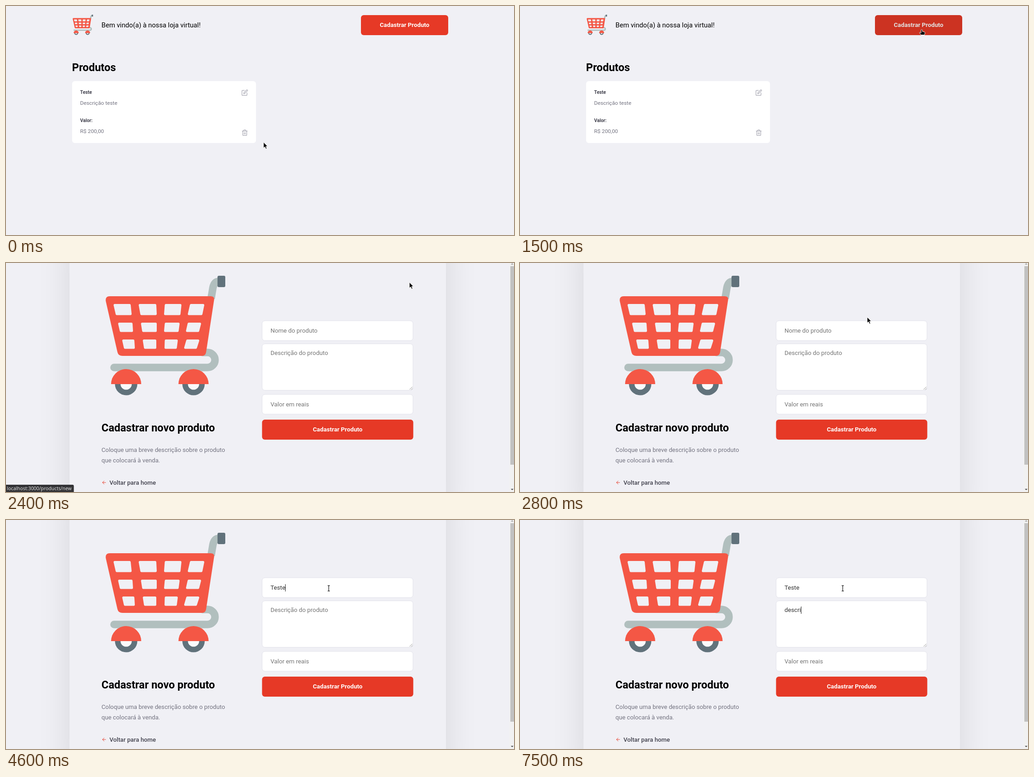
Animation, 1112 px wide and 503 px high, one loop 8000 ms. Source, as an HTML page:

```html
<!DOCTYPE html>
<html lang="pt-BR">
<head>
<meta charset="utf-8">
<title>Loja virtual</title>
<style>
html, body { margin: 0; height: 100%; overflow: hidden; background: #f0f0f5; }
svg { display: block; width: 100vw; height: 100vh; }
text { font: 13.22px Roboto, sans-serif; white-space: pre; }
.title { font-size: 23.5px; font-weight: 700; }
.label { font-size: 10.29px; font-weight: 700; fill: #41414d; }
.info { font-size: 11.76px; fill: #737380; }
.intro { fill: #737380; }
.cta { font-weight: 700; fill: #fff; text-anchor: middle; }
.red { fill: #e63926; }
.icon { fill: none; stroke: #a8a8b3; stroke-width: 2; stroke-linecap: round; stroke-linejoin: round; }
.field { fill: #fff; stroke: #dcdce6; stroke-width: .8; }
.hint { fill: #757575; }
</style>
</head>
<body>
<svg viewBox="0 0 1112 503" preserveAspectRatio="none">
  <defs>
    <filter id="blur" filterUnits="userSpaceOnUse" x="0" y="-200" width="1112" height="900">
      <feGaussianBlur stdDeviation="36.7"/>
    </filter>
    <g id="wheel">
      <circle r="24.5" fill="#61727b"/>
      <circle r="12.3" fill="#fafafc"/>
      <path d="M-33 0A33 33 0 0 1 33 0Z" fill="#f45745"/>
    </g>
    <g id="cart">
      <g fill="none" stroke="#b1bfbe" stroke-width="16.5">
        <path d="M449 78L453 54Q456 40.5 466 40.5"/>
        <path d="M430 196.5H441A16.5 16.5 0 0 1 441 229.5H236.5" stroke-linecap="round"/>
      </g>
      <rect x="463" y="28" width="17" height="25" rx="3" fill="#61727b"/>
      <path d="M227 73H448Q456.500 73 455.500 81L438 196Q436.500 204 429 204H255Q246 204 244 196L218.500 84Q217 73 227 73Z" fill="#f45745"/>
      <path id="holes" fill="#f0f0f5" stroke="#f0f0f5" stroke-width="5" stroke-linejoin="round"/>
      <use href="#wheel" x="263" y="266"/>
      <use href="#wheel" x="410.500" y="266"/>
    </g>
  </defs>

  <g id="home">
    <use href="#cart" transform="translate(108.900 14.200) scale(.17)"/>
    <text x="209" y="46.500" style="font-size:14.690px">Bem vindo(a) à nossa loja virtual!</text>
    <rect class="red" x="777" y="20" width="191" height="44" rx="6"/>
    <text class="cta" x="872.500" y="46">Cadastrar Produto</text>
    <rect id="shade" x="777" y="20" width="191" height="44" rx="6"/>
    <text class="title" x="144.500" y="143">Produtos</text>
    <rect x="144.700" y="165" width="402.500" height="136" rx="6" fill="#fff"/>
    <text class="label" x="162.300" y="192.700">Teste</text>
    <text class="info" x="162.300" y="217">Descrição teste</text>
    <text class="label" x="162.300" y="254.700">Valor:</text>
    <text class="info" x="162.300" y="279">R$ 200,00</text>
    <path class="icon" transform="translate(515.300 183) scale(.6125)" d="M11 4H4a2 2 0 0 0-2 2v14a2 2 0 0 0 2 2h14a2 2 0 0 0 2-2v-7M18.500 2.500a2.121 2.121 0 0 1 3 3L12 15l-4 1 1-4 9.500-9.500z"/>
    <path class="icon" transform="translate(515.300 271) scale(.6125)" d="M3 6h18M19 6v14a2 2 0 0 1-2 2H7a2 2 0 0 1-2-2V6m3 0V4a2 2 0 0 1 2-2h4a2 2 0 0 1 2 2v2M10 11v6M14 11v6"/>
  </g>

  <g id="form">
    <rect x="139" y="-61" width="824" height="625" rx="6" opacity=".1" filter="url(#blur)"/>
    <rect x="139" y="-61" width="824" height="625" rx="6" fill="#f0f0f5"/>
    <use href="#cart"/>
    <text class="title" x="209" y="370">Cadastrar novo produto</text>
    <text class="intro" x="209" y="414.700">Coloque uma breve descrição sobre o produto</text>
    <text class="intro" x="209" y="438">que colocará à venda.</text>
    <path class="icon" style="stroke:#e63926" transform="translate(208.800 476.300) scale(.49)" d="M19 12H5M12 19l-7-7 7-7"/>
    <text x="226.500" y="486.600" style="font-weight:500" fill="#41414d">Voltar para home</text>
    <rect class="field" x="560.700" y="126.900" width="330.200" height="43.600" rx="6"/>
    <rect class="field" x="560.700" y="177.600" width="330.200" height="102" rx="6"/>
    <rect class="field" x="560.700" y="288.700" width="330.200" height="43.300" rx="6"/>
    <path d="M883.500 278L889.500 272M887 278.500L890 275.500" stroke="#777" stroke-width=".8"/>
    <text id="name" x="579" y="153.400"></text>
    <text id="about" x="579" y="202.400"></text>
    <text class="hint" x="579" y="314.500">Valor em reais</text>
    <rect id="caret" width="1" height="16" fill="#222"/>
    <rect class="red" x="560.500" y="344" width="331" height="44" rx="6"/>
    <text class="cta" x="726" y="370.300">Cadastrar Produto</text>
    <rect x="1102" width="10" height="503" fill="#f1f1f1"/>
    <rect x="1104" y="7" width="8" height="436" fill="#c1c1c1"/>
    <path d="M1105 3.500L1108 .5L1111 3.500Z" fill="#a3a3a3"/>
    <path d="M1105 496L1108 499L1111 496Z" fill="#505050"/>
  </g>

  <g id="status">
    <path d="M0 487H145.500Q148.500 487 148.500 490V503H0Z" fill="#333336"/>
    <text x="2" y="499" fill="#e2e2e2" style="font:10.400px 'Noto Sans',sans-serif">localhost:3000/products/new</text>
  </g>

  <g id="pointer" stroke="#fff" stroke-width=".9" stroke-linejoin="round">
    <path id="arrow" d="M0 0V12.500L2.900 9.900L5.100 14.700L7.200 13.700L5.100 9.100H8.900Z"/>
    <path id="hand" d="M-1.500 1Q0-.6 1.300 1V4.500L5.500 5.400Q7 5.800 6.900 7.500L6 12H-1.500L-5 7.500Q-5.500 6-3.800 6.200L-1.500 7.800Z"/>
    <g id="beam" fill="none">
      <path d="M-3-6H3M-3 6H3M0-6V6" stroke-width="2.400"/>
      <path d="M-2.500-6H-.8L0-5.300L.8-6H2.500M-2.500 6H-.8L0 5.300L.8 6H2.500M0-5.300V5.300" stroke="#000" stroke-width="1.100"/>
    </g>
  </g>
</svg>
<script>
const el = id => document.getElementById(id);
const show = (id, on) => el(id).setAttribute('display', on ? 'inline' : 'none');

// Basket windows: [top y, bottom y, then top-left, top-right, bottom-right, bottom-left x of each]
const rows = [
  [90, 114, [235, 273, 275, 240], [290, 329, 330, 294], [347, 384, 382, 346], [402, 434, 430, 398]],
  [131, 151, [245, 277, 278, 249], [295, 330, 330, 298], [347, 380, 378, 346], [397, 427, 423, 394]],
  [168, 188, [254, 281, 282, 258], [299, 329, 329, 302], [347, 376, 374, 347], [394, 423, 418, 390]]
];
el('holes').setAttribute('d', rows.map(([y1, y2, ...quads]) => quads.map(([a, b, c, d]) =>
  `M${a + 3} ${y1 + 2.5}H${b - 2.5}L${c - 2.5} ${y2 - 2}H${d + 2.5}Z`).join('')).join(''));

// [time, x, y, kind]
const moves = [
  [0, 563.8, 299.3, 'arrow'], [100, 562.5, 300, 'arrow'], [200, 561.5, 300.5, 'arrow'],
  [600, 540, 304, 'arrow'], [700, 470, 288, 'arrow'], [800, 402, 258, 'arrow'],
  [900, 379, 214, 'arrow'], [1000, 425, 168, 'arrow'], [1100, 540, 125, 'arrow'],
  [1200, 670, 92, 'arrow'], [1300, 765, 66, 'arrow'], [1400, 886, 27, 'hand'],
  [1500, 879.5, 51.5, 'hand'], [1600, 882, 48, 'hand'], [1700, 883.5, 45, 'hand'],
  [1900, 884.5, 42.8, 'hand'], [2400, 883, 42.5, 'arrow'], [2700, 858, 62, 'arrow'],
  [2800, 760, 119, 'arrow'], [2900, 706.5, 150, 'beam']
];
const nameKeys = [4000, 4100, 4200, 4400, 4600];
const aboutKeys = [6100, 6300, 6500, 7200, 7400, 7500];

function type(id, word, keys, hint, t) {
  const count = keys.filter(k => k <= t).length;
  const node = el(id);
  node.textContent = count ? word.slice(0, count) : hint;
  node.setAttribute('fill', count ? '#333' : '#757575');
  return count ? node.getComputedTextLength() : 0;
}

function draw(now) {
  const t = Math.floor(now % 8000 / 100) * 100;
  const onForm = t >= 2400;
  show('home', !onForm);
  show('form', onForm);
  show('status', t >= 1600 && t < 2800);

  const p = Math.min(1, Math.max(0, (t - 1440) / 200));
  el('shade').setAttribute('opacity', .3 * (1 - (1 - p) ** 1.33));

  const [, x, y, kind] = moves.filter(m => m[0] <= t).pop();
  for (const k of ['arrow', 'hand', 'beam']) show(k, k === kind);
  el('pointer').setAttribute('transform', `translate(${x} ${y})`);

  const nameWidth = type('name', 'Teste', nameKeys, 'Nome do produto', t);
  const aboutWidth = type('about', 'descri', aboutKeys, 'Descrição do produto', t);
  const inAbout = t >= 4900;
  el('caret').setAttribute('x', 579 + Math.round(inAbout ? aboutWidth : nameWidth));
  el('caret').setAttribute('y', inAbout ? 190 : 141);
  show('caret', t >= 3100 && !(t >= 3700 && t < 4000) && !(t >= 5400 && t < 6000));
}

function frame() {
  draw(performance.now());
  requestAnimationFrame(frame);
}
frame();
</script>
</body>
</html>
```
